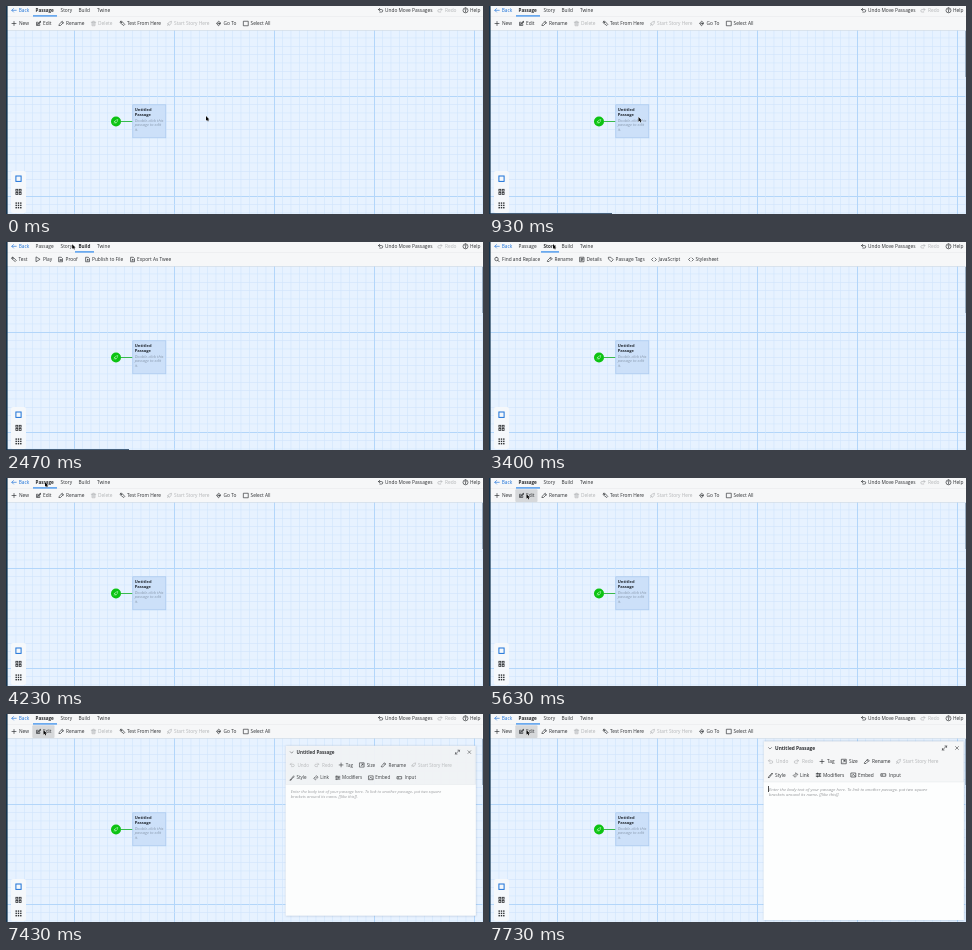
These frames come from a looping animation (477 by 208 pixels, 8 s). An HTML page with a canvas:

```html
<!DOCTYPE html>
<html lang="en">
<head>
<meta charset="utf-8">
<title>Passage editor</title>
<style>
html, body { margin: 0; width: 100%; height: 100%; overflow: hidden; background: #e8f2ff; }
canvas { display: block; width: 477px; height: 208px; }
</style>
</head>
<body>
<canvas id="stage" width="477" height="208"></canvas>
<script>
const ctx = document.getElementById('stage').getContext('2d');
const LOOP = 8000;
const INK = '#2b2d30', MUTED = '#b2b4b6', BLUE = '#1c72d8', BAR = '#f6f7f8';

// Line icons in a 24-unit box
const icons = {
  back: 'M21 12H4M10 5L3 12L10 19',
  plus: 'M12 4V20M4 12H20',
  edit: 'M9 7H4V20H17V15M9 15L20 4M9 15H12L22 6L19 3L9 12Z',
  rename: 'M3 20H8L20 8L15 3L3 15ZM13 6L18 11',
  trash: 'M3 7H21M6 7V21H18V7M9 7V3H15V7M10 11V17M14 11V17',
  tool: 'M6 3V8H10V4L15 9L21 16L17 20L9 14L3 9Z',
  rocket: 'M4 13L12 6L20 3L18 12L11 20L9 15ZM4 20L8 16',
  go: 'M3 10L11 3L20 11L11 20ZM7 12H15M12 9L15 12L12 15',
  select: 'M3 3H21V21H3Z',
  play: 'M6 3V21L21 12Z',
  proof: 'M6 3H15L20 8V21H6ZM10 12H16M10 16H16',
  file: 'M6 3H15L20 8V21H6ZM13 18V11M10 14L13 11L16 14',
  undo: 'M9 4L4 9L9 14M4 9H16A5 5 0 0 1 16 19H9',
  redo: 'M15 4L20 9L15 14M20 9H8A5 5 0 0 0 8 19H15',
  help: 'M12 2A10 10 0 1 0 12 22A10 10 0 1 0 12 2M9 9A3 3 0 1 1 12 13M12 16V18',
  size: 'M3 3H21V21H3ZM9 15L16 8M11 8H16V13',
  style: 'M3 21L8 16L18 4L21 7L10 17L8 21Z',
  link: 'M10 14L15 9M11 6L14 3L21 10L17 14M13 18L10 21L3 14L7 10',
  mods: 'M3 6H21M3 12H21M3 18H21M8 4V8M16 10V14M8 16V20',
  embed: 'M3 4H21V20H3ZM7 14L11 9L18 17',
  input: 'M3 7H21V17H3ZM7 10V14',
  search: 'M10 3A7 7 0 1 0 10 17A7 7 0 1 0 10 3M15 15L21 21',
  tag: 'M3 3H11L21 13L13 21L3 11Z',
  code: 'M8 6L2 12L8 18M16 6L22 12L16 18',
  info: 'M4 3H20V21H4ZM8 8H16M8 12H16M8 16H13',
  down: 'M5 9L12 16L19 9',
  expand: 'M14 3H21V10M21 3L13 11M10 21H3V14M3 21L11 13',
  close: 'M5 5L19 19M19 5L5 19'
};
for (const k in icons) icons[k] = new Path2D(icons[k]);

// Each entry: icon, icon centre x, text x, label, disabled
const toolbars = {
  Passage: [
    ['plus', 8, 13, 'New'], ['edit', 32.5, 37, 'Edit'], ['rename', 55.5, 60, 'Rename'],
    ['trash', 87.5, 92, 'Delete', 1], ['tool', 116.5, 121, 'Test From Here'],
    ['rocket', 163.5, 168, 'Start Story Here', 1], ['go', 213, 217.5, 'Go To'],
    ['select', 240, 244.5, 'Select All']
  ],
  Story: [
    ['search', 8, 13, 'Find and Replace'], ['rename', 61, 65.5, 'Rename'],
    ['info', 93, 97.5, 'Details'], ['tag', 122, 126.5, 'Passage Tags'],
    ['code', 165, 169.5, 'JavaScript'], ['code', 202, 206.5, 'Stylesheet']
  ],
  Build: [
    ['tool', 8, 12.5, 'Test'], ['play', 31.5, 37, 'Play'], ['proof', 54.5, 59.5, 'Proof'],
    ['file', 81.5, 86, 'Publish to File'], ['file', 126.5, 131, 'Export As Twee']
  ]
};
const history = [
  ['undo', 374.5, 379, 'Undo Move Passages'], ['redo', 434, 439, 'Redo', 1],
  ['help', 459.5, 464, 'Help']
];
const dialogTop = [
  ['undo', 281.5, 287, 'Undo', 1], ['redo', 307.5, 313, 'Redo', 1], ['plus', 333, 338, 'Tag'],
  ['size', 355, 360, 'Size'], ['rename', 378, 383, 'Rename'],
  ['rocket', 409.5, 414, 'Start Story Here', 1]
];
const dialogMarkup = [
  ['style', 281.5, 286, 'Style'], ['link', 306.5, 311, 'Link'], ['mods', 329.5, 334, 'Modifiers'],
  ['embed', 364.5, 369, 'Embed'], ['input', 394.5, 400, 'Input']
];
const tabs = [['Passage', 29.5, 27, 24], ['Story', 54.5, 52, 18], ['Build', 72.5, 69, 19], ['Twine', 91, 88, 19]];

// Pointer moves: start, end, from x, y, to x, y
const moves = [
  [200, 630, 200, 110, 149.5, 111],
  [1830, 1830, 149.5, 111, 78, 3],
  [2200, 2560, 78, 3, 64, 2],
  [3400, 3730, 64, 2, 39, 4],
  [5300, 5630, 39, 4, 37.5, 16]
];

const clamp = v => Math.max(0, Math.min(1, v));
const ease = v => v * v * (3 - 2 * v);

function rect(x, y, w, h, color) {
  ctx.fillStyle = color;
  ctx.fillRect(x, y, w, h);
}

// Large type scaled down keeps fractional letter spacing
function text(str, x, y, color = INK, size = 4.8, style = '') {
  ctx.save();
  ctx.translate(x, y);
  ctx.scale(0.1, 0.1);
  ctx.font = `${style} ${size * 10}px "Open Sans", "Noto Sans", sans-serif`;
  ctx.textBaseline = 'alphabetic';
  ctx.fillStyle = color;
  ctx.fillText(str, 0, 0);
  ctx.restore();
}

function icon(name, cx, cy, color = INK, size = 6, weight = 2.6) {
  ctx.save();
  ctx.translate(cx - size / 2, cy - size / 2);
  ctx.scale(size / 24, size / 24);
  ctx.strokeStyle = color;
  ctx.lineWidth = weight;
  ctx.lineJoin = ctx.lineCap = 'round';
  ctx.stroke(icons[name]);
  ctx.restore();
}

function buttons(list, y) {
  for (const [name, cx, tx, label, off] of list) {
    const color = off ? MUTED : INK;
    icon(name, cx, y, color);
    text(label, tx, y + 1.8, color);
  }
}

function grid() {
  rect(0, 24, 477, 184, '#e7f2ff');
  const step = 100 / 12;
  for (let i = -8; i < 50; i++) {
    const p = 68 + i * step, major = i % 12 === 0;
    const color = major ? '#b3d6fa' : '#d0e5fc', w = major ? 1 : 0.6;
    rect(p, 24, w, 184, color);
    const q = 90 + i * step;
    if (q > 24 && q < 208) rect(0, q, 477, w, color);
  }
}

function card() {
  rect(115, 115, 12, 0.9, '#27b53a');
  ctx.fillStyle = '#0cc312';
  ctx.beginPath();
  ctx.arc(110, 115.5, 5, 0, 7);
  ctx.fill();
  icon('rocket', 110, 115.5, '#d9ffdb', 5.4, 2.2);
  rect(126.5, 98.5, 33.5, 33.5, '#cce0f9');
  ctx.strokeStyle = '#a9c9ef';
  ctx.lineWidth = 0.7;
  ctx.strokeRect(126.8, 98.8, 33, 33);
  text('Untitled', 128.7, 105.1, '#20262e', 4.1, 'bold');
  text('Passage', 128.7, 110, '#20262e', 4.1, 'bold');
  ['Double-click this', 'passage to edit', 'it.'].forEach((s, i) =>
    text(s, 128.7, 115.6 + i * 4.7, '#8797ab', 4, 'italic'));
}

function zoomPanel() {
  ctx.fillStyle = '#f5f8fb';
  ctx.beginPath();
  ctx.roundRect(5, 165, 15, 42, 2);
  ctx.fill();
  ctx.strokeStyle = BLUE;
  ctx.lineWidth = 1;
  ctx.strokeRect(9.9, 170, 5.2, 5.4);
  ctx.strokeStyle = INK;
  ctx.lineWidth = 0.8;
  for (let i = 0; i < 4; i++) ctx.strokeRect(9.9 + i % 2 * 3.3, 183.3 + (i >> 1) * 3.2, 1.9, 1.9);
  for (let i = 0; i < 9; i++) rect(9.5 + i % 3 * 2.3, 196.4 + Math.floor(i / 3) * 2.3, 1.4, 1.4, INK);
}

function header(t) {
  const active = t < 2030 ? 'Passage' : t < 2930 ? 'Build' : t < 4130 ? 'Story' : 'Passage';
  rect(0, 0, 477, 24, BAR);
  rect(0, 10.3, 477, 0.5, '#e4e6e8');
  rect(0, 24, 477, 0.7, '#d5dde6');
  icon('back', 8, 4.3, BLUE);
  text('Back', 12.7, 6.1, BLUE);
  for (const [name, x, left, w] of tabs) {
    const on = name === active;
    text(name, x, 6.1, INK, on ? 4.6 : 4.8, on ? 'bold' : '');
    if (on) rect(left, 9.2, w, 1.4, '#4a98ee');
  }
  buttons(history, 4.3);
  if (t >= 5500) {
    ctx.fillStyle = t >= 7170 && t < 7430 ? '#adb0b3' : '#d6d8da';
    ctx.beginPath();
    ctx.roundRect(26.3, 11.3, 22.2, 12.7, 1);
    ctx.fill();
  }
  buttons(toolbars[active], 17.5);
}

function dialog(t) {
  if (t < 7270) return;
  let scale = 1, alpha = 1;
  if (t < 7330) [scale, alpha] = [0.5, 0.08];
  else if (t < 7430) [scale, alpha] = [0.63, 0.27];
  else if (t < 7570) [scale, alpha] = [0.95, 0.93];
  ctx.save();
  ctx.globalAlpha = alpha;
  ctx.translate(374.7, 116.5);
  ctx.scale(scale, scale);
  ctx.translate(-374.7, -116.5);
  ctx.shadowColor = 'rgba(60,90,130,.35)';
  ctx.shadowBlur = 2;
  rect(274.7, 27.3, 200, 178.7, BAR);
  ctx.shadowColor = 'transparent';
  rect(274.7, 68, 200, 138, '#fdfefe');
  rect(274.7, 67.7, 200, 0.5, '#e2e6ea');
  icon('down', 281, 34.2, INK, 5);
  text('Untitled Passage', 286, 35.9, INK, 4.8, 'bold');
  icon('expand', 455.5, 34, INK, 5.5);
  icon('close', 468, 34, INK, 5);
  buttons(dialogTop, 47.5);
  buttons(dialogMarkup, 61);
  text('Enter the body text of your passage here. To link to another passage, put two square',
    280, 76.6, '#929598', 4.3, 'italic');
  text('brackets around its name, [[like this]].', 280, 82, '#929598', 4.3, 'italic');
  if (t >= 7730) rect(279, 72, 0.8, 6, '#222');
  ctx.restore();
}

function pointer(t) {
  let x = 200, y = 110;
  for (const [a, b, x0, y0, x1, y1] of moves) {
    if (t < a) break;
    const k = a === b ? 1 : ease(clamp((t - a) / (b - a)));
    x = x0 + (x1 - x0) * k;
    y = y0 + (y1 - y0) * k;
  }
  ctx.save();
  ctx.translate(x, y);
  ctx.beginPath();
  [[0, 0], [0, 4.7], [1.1, 3.8], [1.9, 5.4], [2.7, 5], [2, 3.5], [3.4, 3.4]]
    .forEach(p => ctx.lineTo(...p));
  ctx.closePath();
  ctx.strokeStyle = 'rgba(255,255,255,.75)';
  ctx.lineWidth = 0.8;
  ctx.stroke();
  ctx.fillStyle = '#080808';
  ctx.fill();
  ctx.restore();
}

function draw(t) {
  grid();
  card();
  zoomPanel();
  header(t);
  if (t >= 600 && t < 2930) rect(0, 207, 123, 1, '#47617c');
  if (t >= 930) rect(476.3, 25, 0.7, 46, '#8297ad');
  rect(0, 0, 1.6, 208, '#17344d');
  dialog(t);
  pointer(t);
}

const start = performance.now();
function frame() {
  draw((performance.now() - start) % LOOP);
  requestAnimationFrame(frame);
}
frame();
</script>
</body>
</html>
```
